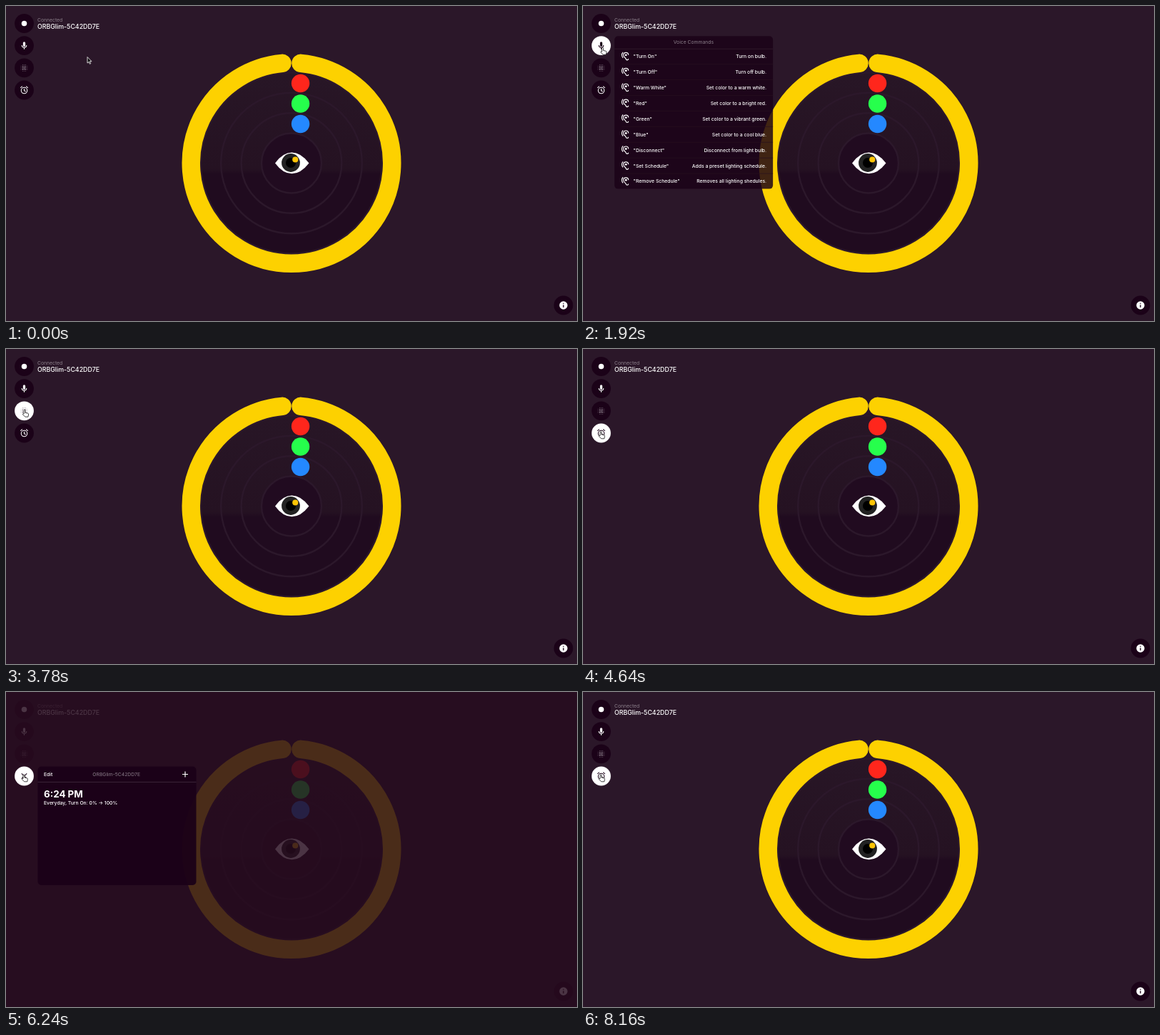
Animation of 800x442 px, one loop 8.18 s. Source, as an HTML page:

```html
<!DOCTYPE html>
<html lang="en">
<head>
<meta charset="utf-8">
<title>Bulb control</title>
<style>
html, body { margin: 0; width: 100%; height: 100%; overflow: hidden; background: #2b1729; }
svg { display: block; width: 800px; height: 442px; font-family: Inter, Roboto, sans-serif; }
text { fill: #fff; font-size: 6.8px; font-weight: 500; }
.mute { fill: #8b7f8a; font-weight: 400; }
.line { fill: none; stroke: currentColor; stroke-width: 2; }
.solid { fill: currentColor; }
.end { text-anchor: end; }
.mid { text-anchor: middle; }
</style>
</head>
<body>
<svg id="stage" viewBox="0 0 800 442"></svg>
<script>
const LOOP = 8180;
const DEVICE = "ORBGlim-5C42DD7E";
const DARK = [27, 2, 24], WHITE = [255, 255, 255];

const circle = (x, y, r, attr) => `<circle cx="${x}" cy="${y}" r="${r}" ${attr}/>`;
const label = (x, y, s, attr = "") => `<text x="${x}" y="${y}" ${attr}>${s}</text>`;
const rule = (x1, x2, y, color) => `<path d="M${x1} ${y}H${x2}" stroke="${color}" stroke-width=".7"/>`;

// Icons live in a 24 unit box.
function blurDots() {
  const pos = [3.5, 8, 12, 16, 20.5], size = [.65, 1, 1.25, 1, .65];
  let out = "";
  pos.forEach((y, j) => pos.forEach((x, i) => {
    const corner = (i % 4 === 0) && (j % 4 === 0);
    if (!corner) out += circle(x, y, Math.min(size[i], size[j]), 'class="solid"');
  }));
  return out;
}
const icons = {
  dot: circle(12, 12, 7, 'class="solid"'),
  mic: '<rect x="9" y="2" width="6" height="12.5" rx="3" class="solid"/>' +
       '<path class="line" d="M6 11a6 6 0 0 0 12 0M12 17v4.5"/>',
  grid: blurDots(),
  alarm: circle(12, 13, 8, 'class="line"') +
       '<path class="line" d="M12 8v5.5l4 2.3M2 6l5-4M22 6l-5-4"/>',
  cross: '<path class="line" d="M5 5l14 14M19 5L5 19"/>',
  ear: '<path class="line" d="M20 9A6 6 0 0 0 8 9C8 15 12.5 14 13.6 17.8Q14.6 21 17 21A3 3 0 0 0 20 18' +
       'M7 2A9.8 9.8 0 0 0 7 16"/>' + circle(14, 9, 2.5, 'class="solid"')
};
const icon = (name, x, y, k, attr = "") =>
  `<g transform="translate(${x - 12 * k} ${y - 12 * k}) scale(${k})" ${attr}>${icons[name]}</g>`;
const button = (id, y, body) =>
  `<g id="${id}" color="#fff">${circle(25.5, y, 13.4, 'fill="#1b0218"')}${body}</g>`;

function dial() {
  const cx = 400, cy = 220.5, r = 140.75, dx = 13;
  const top = cy - Math.sqrt(r * r - dx * dx);
  const tracks = [127, 98.8, 70.3, 42].map((q, i) =>
    circle(cx, cy, q, `fill="${i === 3 ? "#210b20" : "none"}" stroke="#2c182b" stroke-width="2.4"`)).join("");
  const knobs = ["#ff261c", "#26ff4c", "#2488ff"].map((c, i) =>
    circle(412.6, 108.5 + i * 28.5, 12.7, `fill="${c}"`)).join("");
  return circle(cx, cy, 129, 'fill="url(#face)"') + tracks +
    `<path d="M${cx + dx} ${top}A${r} ${r} 0 1 1 ${cx - dx} ${top}" fill="none"
      stroke="#fdd100" stroke-width="25.5" stroke-linecap="round"/>` + knobs +
    '<path d="M377 220.5Q388 205.6 400.5 205.6T424.5 220.5Q413 235.3 400.5 235.3T377 220.5Z" fill="#fff"/>' +
    circle(399, 220, 12.9, 'fill="#222"') + circle(399, 220, 7, 'fill="#000"') +
    circle(405.3, 215.5, 4.1, 'fill="#fdc506"');
}

function voicePanel() {
  const rows = [
    ["Turn On", "Turn on bulb."],
    ["Turn Off", "Turn off bulb."],
    ["Warm White", "Set color to a warm white."],
    ["Red", "Set color to a bright red."],
    ["Green", "Set color to a vibrant green."],
    ["Blue", "Set color to a cool blue."],
    ["Disconnect", "Disconnect from light bulb."],
    ["Set Schedule", "Adds a preset lighting schedule."],
    ["Remove Schedule", "Removes all lighting shedules."]
  ];
  let out = '<rect x="44.5" y="42.2" width="222" height="214.4" rx="5" fill="#1b0218" fill-opacity=".83"/>' +
    label(155.3, 53.4, "Voice Commands", 'class="mid mute"') + rule(44.5, 266.5, 60.2, "#35202f");
  rows.forEach(([name, info], i) => {
    const y = 70.6 + i * 21.93;
    out += icon("ear", 59.4, y, .58, 'color="#fff"') +
      label(71, y + 2.4, `"${name}"`) + label(257.5, y + 2.4, info, 'class="end"');
    if (i < rows.length - 1) out += rule(55, 266.5, y + 11, "#28101f");
  });
  return out;
}

function schedulePanel() {
  return '<rect x="44.5" y="104.5" width="222" height="166.5" rx="5" fill="#1b0018" fill-opacity=".94"/>' +
    label(53, 117.8, "Edit") + label(154.7, 117.8, DEVICE, 'class="mid mute"') +
    '<path d="M247 115.5h8M251 111.5v8" stroke="#fff" stroke-width="1.2"/>' +
    rule(44.5, 266.5, 126.4, "#4a3547") +
    label(53, 148.4, "6:24 PM", 'style="font-size:13.4px;font-weight:700"') +
    label(53, 157.8, "Everyday, Turn On: 0% → 100%");
}

const stage = document.getElementById("stage");
stage.innerHTML = `
  <defs><linearGradient id="face" x1="0" y1="0" x2="0" y2="1">
    <stop offset="0" stop-color="#281626"/><stop offset=".53" stop-color="#251222"/>
    <stop offset=".56" stop-color="#200b1f"/><stop offset="1" stop-color="#200b1f"/>
  </linearGradient></defs>
  <rect width="800" height="442" fill="#2b1729"/>
  ${dial()}
  ${label(44, 22.3, "Connected", 'class="mute"')}
  ${label(44, 32.2, DEVICE, 'style="font-size:8.8px"')}
  ${button("link", 24.5, icon("dot", 25.5, 24.5, .54))}
  ${button("mic", 55.6, icon("mic", 25.5, 55.6, .54))}
  ${button("grid", 86.8, icon("grid", 25.5, 86.8, .52))}
  ${circle(781, 420, 13.4, 'fill="#1b0218"')}${circle(781, 420, 5.7, 'fill="#fff"')}
  <path d="M781 419.2v3.8M781 416.7v1.3" stroke="#1b0218" stroke-width="1.3"/>
  <g id="voice">${voicePanel()}</g>
  <rect id="shade" width="800" height="442" fill="#270c1f"/>
  <g id="plan">${schedulePanel()}</g>
  ${button("alarm", 118, `<g id="clock">${icon("alarm", 25.5, 118, .53)}</g><g id="cross">${icon("cross", 25.5, 118, .53)}</g>`)}
  <path id="arrow" d="M0 0V8.6L2 6.8 3.3 9.8 4.7 9.2 3.4 6.2H6Z" fill="#111" stroke="#fff" stroke-width=".8"/>
  <path id="hand" d="M-1 5.6V1a1 1 0 0 1 2 0V4l3.2.7Q5.6 5 5.4 6.5L4.8 9.8H.6L-2.5 6.6C-3 5.4-1.8 4.8-1 5.6Z"
    fill="#fff" stroke="#111" stroke-width=".8"/>`;

const el = {};
stage.querySelectorAll("g[id],path[id],rect[id]").forEach(n => el[n.id] = n);

const clamp = v => Math.max(0, Math.min(1, v));
const span = (t, a, d) => clamp((t - a) / d);
const smooth = p => p * p * (3 - 2 * p);
const mix = (a, b, p) => `rgb(${a.map((v, i) => Math.round(v + (b[i] - v) * p))})`;
const pulse = (t, on, off, rise, fall) => span(t, on, rise) * (1 - span(t, off, fall));

// Pointer stops: time, x, y
const path = [
  [300, 114, 71.5], [800, 27, 25], [1250, 27, 27], [1500, 27.5, 58], [2850, 27.5, 60],
  [3120, 28, 73], [3300, 26.5, 84], [4050, 26, 86], [4300, 25, 116], [LOOP, 25, 116]
];
function pointer(t) {
  if (t <= path[0][0]) return path[0].slice(1);
  const i = path.findIndex(s => s[0] >= t), a = path[i - 1], b = path[i];
  const p = smooth(span(t, a[0], b[0] - a[0]));
  return [a[1] + (b[1] - a[1]) * p, a[2] + (b[2] - a[2]) * p];
}

function tint(id, p) {
  el[id].firstElementChild.setAttribute("fill", mix(DARK, WHITE, p));
  el[id].setAttribute("color", mix(WHITE, DARK, p));
}
function slide(id, p) {
  el[id].setAttribute("opacity", clamp(p * 1.3));
  el[id].setAttribute("transform", `translate(${-8 * (1 - p) ** 2} 0)`);
}

function draw(t) {
  tint("link", pulse(t, 720, 1370, 200, 300));
  tint("mic", pulse(t, 1420, 3150, 200, 300));
  tint("grid", pulse(t, 3170, 4150, 200, 300));
  tint("alarm", span(t, 4200, 200));
  slide("voice", pulse(t, 1483, 3150, 560, 400));

  const open = pulse(t, 5440, 7750, 560, 400);
  slide("plan", open);
  el.shade.setAttribute("opacity", .83 * (1 - (1 - open) ** 3));
  const crossed = clamp(open * 4);
  el.cross.setAttribute("opacity", crossed);
  el.clock.setAttribute("opacity", 1 - crossed);

  const [x, y] = pointer(t);
  const arrow = t < 740 || (t > 3060 && t < 3190);
  el.arrow.setAttribute("visibility", arrow ? "visible" : "hidden");
  el.hand.setAttribute("visibility", arrow ? "hidden" : "visible");
  for (const c of [el.arrow, el.hand]) c.setAttribute("transform", `translate(${x} ${y})`);
}

function tick() {
  draw(performance.now() % LOOP);
  requestAnimationFrame(tick);
}
tick();
</script>
</body>
</html>
```
